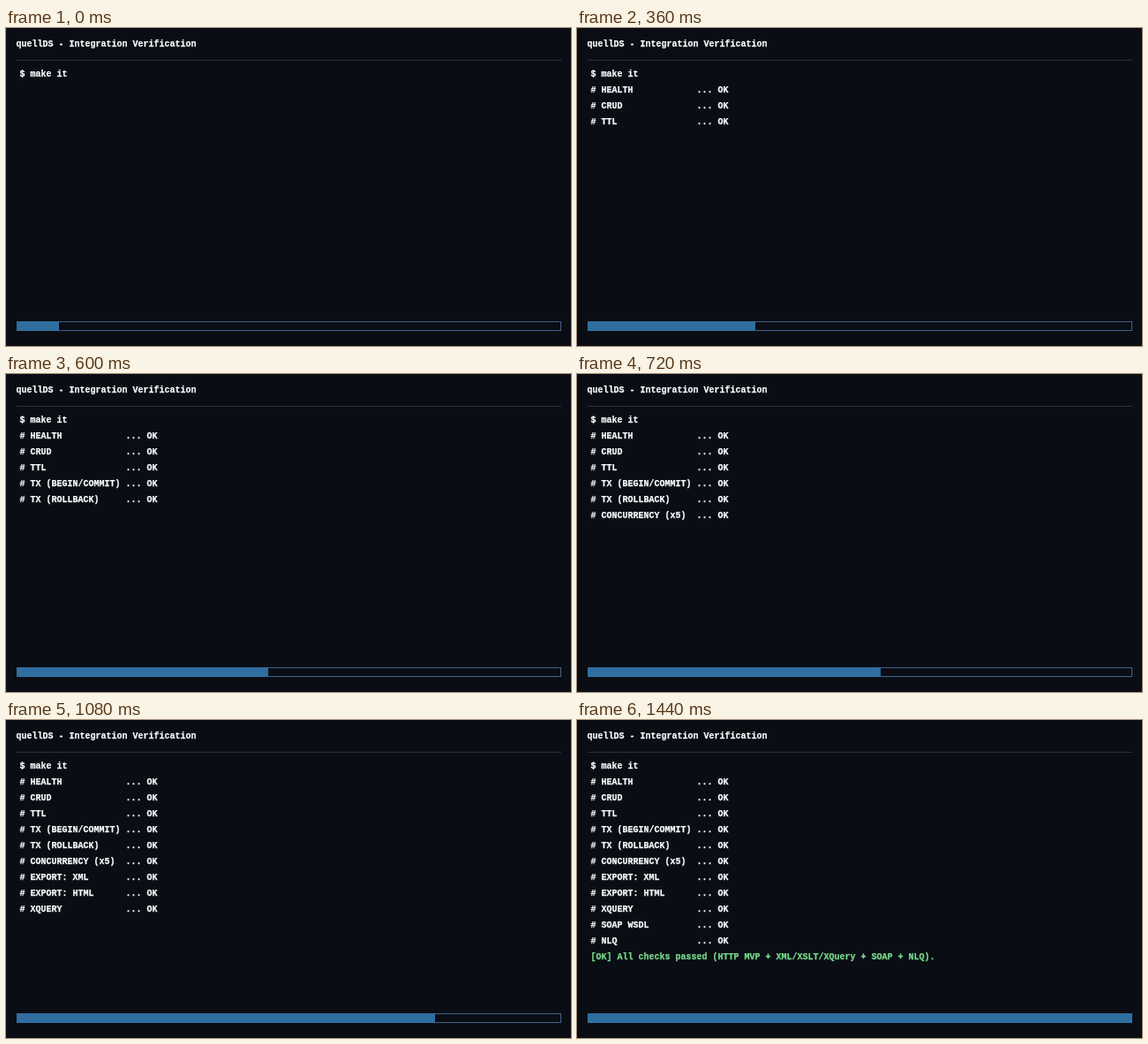
Recreate the animation shown at these times as an HTML page. Size 640x360 px, loop 1560 ms.

```html
<!DOCTYPE html>
<html lang="en">
<head>
<meta charset="utf-8">
<title>Integration Verification</title>
<style>
  html, body { margin: 0; width: 100%; height: 100%; overflow: hidden; background: #0a0d14; }
  svg { display: block; width: 640px; height: 360px; }
  text {
    font: bold 10px "Liberation Mono", "Courier New", monospace;
    fill: #fafcff;
    stroke: #fafcff;
    stroke-width: 0.25px;
    white-space: pre;
  }
  text.pass { fill: #78dc8c; stroke: #78dc8c; }
</style>
</head>
<body>
<svg viewBox="0 0 640 360" shape-rendering="crispEdges">
  <rect width="640" height="360" fill="#0a0d14"/>
  <text x="11.4" y="21">quellDS - Integration Verification</text>
  <rect x="12" y="36" width="617" height="1" fill="#283246"/>
  <g id="log"></g>
  <rect x="12.5" y="332.5" width="616" height="10" fill="none" stroke="#465f87"/>
  <rect id="bar" x="12" y="332" height="11" fill="#306ea0"/>
</svg>
<script>
const STEP = 120;
const checks = [
  "HEALTH", "CRUD", "TTL", "TX (BEGIN/COMMIT)", "TX (ROLLBACK)", "CONCURRENCY (x5)",
  "EXPORT: XML", "EXPORT: HTML", "XQUERY", "SOAP WSDL", "NLQ"
];
const lines = [
  "$ make it",
  ...checks.map(name => `# ${name}`.padEnd(20) + "... OK"),
  "[OK] All checks passed (HTTP MVP + XML/XSLT/XQuery + SOAP + NLQ)."
];
const log = document.getElementById("log");
const bar = document.getElementById("bar");

const rows = lines.map((line, i) => {
  const row = document.createElementNS("http://www.w3.org/2000/svg", "text");
  row.setAttribute("x", 15.4);
  row.setAttribute("y", 55 + i * 18);
  row.textContent = line;
  if (line.startsWith("[OK]")) row.setAttribute("class", "pass");
  return log.appendChild(row);
});

function draw(time) {
  const shown = Math.floor(time / STEP) % lines.length + 1;
  rows.forEach((row, i) => row.setAttribute("visibility", i < shown ? "visible" : "hidden"));
  bar.setAttribute("width", Math.floor(616 * shown / lines.length) + 1);
}

let start;
function tick(now) {
  start ??= now;
  draw(Math.max(0, now - start));
  requestAnimationFrame(tick);
}
draw(0);
requestAnimationFrame(tick);
</script>
</body>
</html>
```
